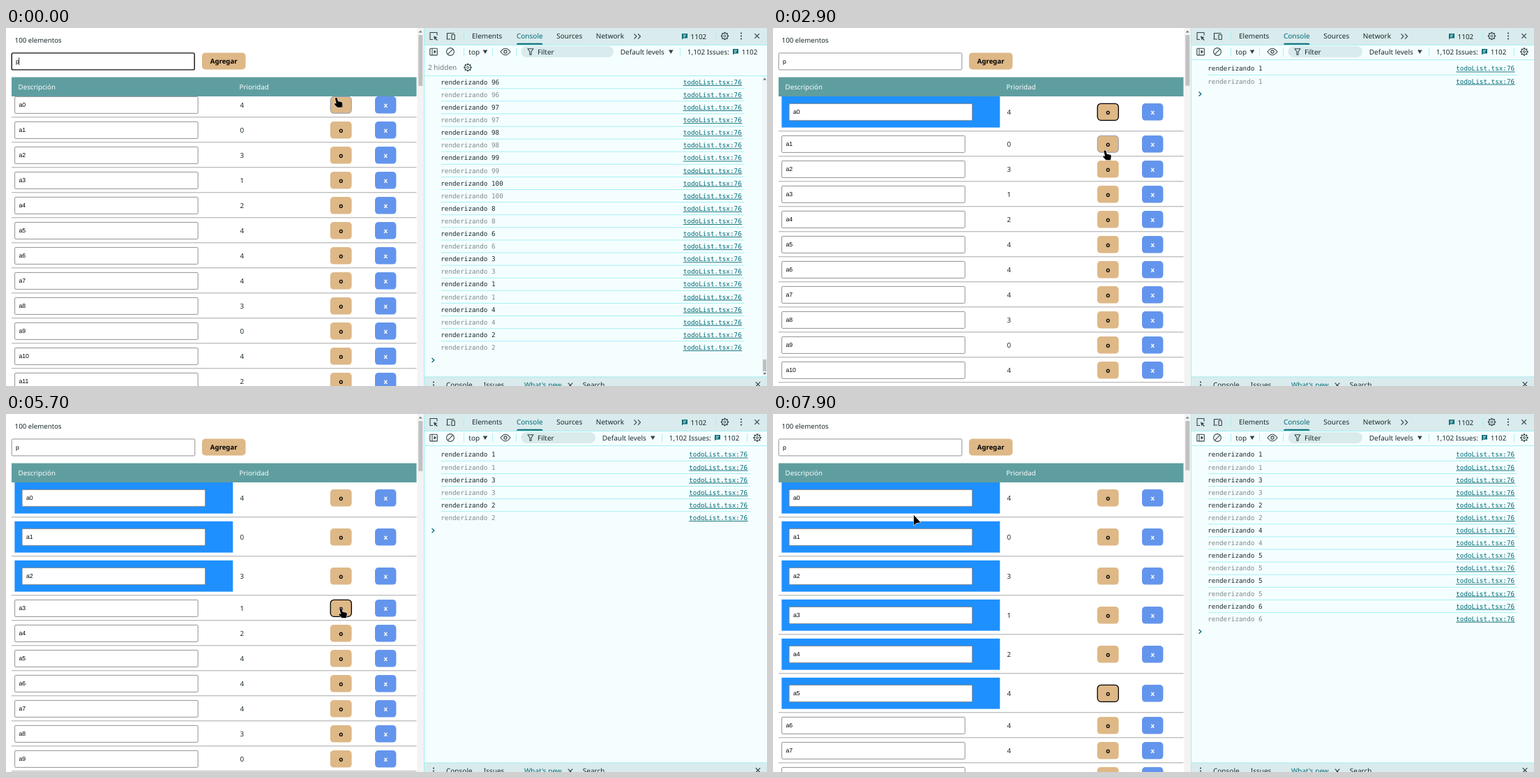
Recreate the animation shown at these times as an HTML page with a canvas. Size 1091 px wide and 513 px high, loop 8 s.

```html
<!DOCTYPE html>
<html lang="es">
<head>
<meta charset="utf-8">
<title>Lista de tareas</title>
<style>
html, body { margin: 0; width: 100%; height: 100%; overflow: hidden; background: #fff; }
canvas { display: block; width: 1091px; height: 513px; }
</style>
</head>
<body>
<canvas id="stage"></canvas>
<script>
const W = 1091, H = 513, LOOP = 8000, STEP = 100;
const canvas = document.getElementById('stage');
const ctx = canvas.getContext('2d');
const dpr = window.devicePixelRatio || 1;
canvas.width = W * dpr;
canvas.height = H * dpr;

const SANS = '"Noto Sans", "Open Sans", sans-serif';
const MONO = '"DejaVu Sans Mono", "Noto Sans Mono", monospace';
const ARIAL = '"Liberation Sans", Arial, sans-serif';
const INK = '#1c2b2d', TEAL = '#006a75', BAR = '#d9ebed', PANEL = '#f5feff', LINE = '#a6f0f3', ICON = '#334345';

const priorities = [4, 0, 3, 1, 2, 4, 4, 4, 3, 0, 4, 2];
const oldLogs = [96, 97, 98, 99, 100, 8, 6, 3, 1, 4, 2];
// [time, row that opens or -1, logged number]
const renders = [[2900, 0, 1], [3700, 2, 3], [4800, 1, 2], [5800, 3, 4], [6700, 4, 5], [6900, -1, 5], [7600, 5, 6]];
// [time, focused row]
const focuses = [[2900, 0], [3500, 2], [4600, 1], [5700, 3], [6500, 4], [7400, 5]];
// [first step, last step, x, y]
const moves = [
  [100, 700, 639, 28.5], [1500, 2300, 478, 107], [2900, 2900, 476, 175.5], [3000, 3400, 479, 204],
  [3700, 4500, 479, 165.5], [5000, 5600, 480, 278.5], [6000, 6400, 477, 339.5], [6800, 7300, 477, 386],
  [7900, 7900, 201.8, 144.8]
];

function pointer(t) {
  let x = 473.5, y = 100;
  for (const [a, b, nx, ny] of moves) {
    if (t < a) break;
    const p = Math.min(1, (t - a + STEP) / (b - a + STEP));
    const e = p * p * (3 - 2 * p);
    x += (nx - x) * e;
    y += (ny - y) * e;
  }
  return { x, y };
}

function text(s, x, y, size, color = INK, { font = SANS, weight = 400, align = 'left' } = {}) {
  ctx.font = `${weight} ${size}px ${font}`;
  ctx.textAlign = align;
  ctx.fillStyle = color;
  ctx.fillText(s, x, y);
}
function rect(x, y, w, h, color) {
  ctx.fillStyle = color;
  ctx.fillRect(x, y, w, h);
}
function round(x, y, w, h, r, fill, stroke, lw = 1) {
  ctx.beginPath();
  ctx.roundRect(x, y, w, h, r);
  paint(fill, stroke, lw);
}
function circle(x, y, r, fill, stroke, lw = 1.2) {
  ctx.beginPath();
  ctx.arc(x, y, r, 0, Math.PI * 2);
  paint(fill, stroke, lw);
}
function shape(d, x, y, fill, stroke, lw = 1.2) {
  ctx.save();
  ctx.translate(x, y);
  const path = new Path2D(d);
  ctx.lineJoin = 'round';
  if (stroke) { ctx.strokeStyle = stroke; ctx.lineWidth = lw; ctx.stroke(path); }
  if (fill) { ctx.fillStyle = fill; ctx.fill(path); }
  ctx.restore();
}
function paint(fill, stroke, lw) {
  if (fill) { ctx.fillStyle = fill; ctx.fill(); }
  if (stroke) { ctx.strokeStyle = stroke; ctx.lineWidth = lw; ctx.stroke(); }
}

function field(x, y, value, focused) {
  if (focused) round(x + .5, y + .5, 262, 24, 2, '#fff', '#101010', 1.4);
  else round(x + .5, y + .5, 262.6, 24, 1.5, '#fff', '#858585', .9);
  text(value, x + 6.3, y + 15.5, 8.7, '#000', { font: ARIAL });
}

function layout(t) {
  const open = new Set(renders.filter(r => t >= r[0]).map(r => r[1]));
  let top = 92;
  return priorities.map((priority, i) => {
    const big = open.has(i), h = big ? 56 : 36;
    const row = { i, priority, big, top, mid: top + h / 2 + .3, end: top + h };
    top += h;
    return row;
  });
}

function overButton(p, row) {
  return p.x >= 465 && p.x <= 496 && p.y >= row.mid - 12.5 && p.y <= row.mid + 12.5;
}

function drawPage(t, rows, p) {
  const focus = focuses.filter(f => t >= f[0]).pop();
  rect(0, 0, 599, H, '#fff');
  for (const r of rows) {
    const y = r.mid;
    if (r.big) rect(12.4, r.top + 5.8, 312.9, 44.8, '#1e90ff');
    field(r.big ? 22.6 : 12.1, y - 12.4, 'a' + r.i);
    text(r.priority, 335.4, y + 3.5, 9.8);
    const focused = focus && focus[1] === r.i;
    round(464.8, y - 12.3, 30.8, 24.6, 5, '#deb887');
    if (focused) round(465.2, y - 12, 30.1, 24, 5, null, '#000', 1.3);
    else if (overButton(p, r)) round(465.3, y - 11.9, 29.9, 23.8, 5, null, '#8a9bb8', .9);
    text('o', 480.3, y + 3.4, 9.7, '#000', { weight: 700, align: 'center' });
    round(529, y - 12.3, 30.4, 24.6, 5, '#6495ed');
    text('x', 544.2, y + 3.4, 9.7, '#fff', { weight: 700, align: 'center' });
    rect(8, r.end - .8, 580.5, 1.1, '#b0b0b0');
  }
  rect(0, 0, 589, 92, '#fff');
  rect(8, 70.5, 580.5, 27.5, '#5f9ea0');
  text('Descripción', 17.6, 87.6, 9.7, '#fff');
  text('Prioridad', 334.6, 87.6, 9.7, '#fff');
  text('100 elementos', 12.6, 20.7, 9.7);
  field(7.7, 35.4, 'p', t < 900);
  if (t < 400) rect(18.3, 42.5, .8, 10.5, '#000');
  round(281, 35.4, 62.5, 24, 5, '#deb887');
  text('Agregar', 312.2, 50.7, 9.6, '#000', { weight: 700, align: 'center' });

  rect(589.5, 0, 9.5, H, '#f3f3f3');
  shape('M-2.6 1.5 L0 -1.5 L2.6 1.5Z', 594.2, 5, '#7c7c7c');
  const extra = rows.filter(r => r.big).length * 20;
  rect(591.3, 10, 6, 73 * 3712 / (3712 + extra), '#c1c1c1');
}

function gear(x, y) {
  for (let i = 0; i < 8; i++) {
    ctx.save();
    ctx.translate(x, y);
    ctx.rotate(i * Math.PI / 4);
    rect(-1, -5.7, 2, 2, ICON);
    ctx.restore();
  }
  circle(x, y, 4.1, null, ICON, 1);
  circle(x, y, 1.5, null, ICON, 1);
}
function cross(x, y) { shape('M-3.3 -3.3 L3.3 3.3 M3.3 -3.3 L-3.3 3.3', x, y, null, ICON, 1.2); }
function dots(x, y) { for (const d of [-4, 0, 4]) circle(x, y + d, 1.1, ICON); }
function caretDown(x, y) { shape('M-3.3 -2.5 H3.3 L0 3Z', x, y, ICON); }
function divider(x, y) { rect(x, y - 6, .9, 12, LINE); }
function issueIcon(x, y) {
  shape('M-4 -4 H4 V2.5 H-2 L-4 4.5Z', x, y, TEAL);
  rect(x - 2.2, y - 2.4, 4.4, 1, '#fff');
  rect(x - 2.2, y - .2, 3.2, 1, '#fff');
}

function drawTabs() {
  rect(599, 0, 492, 24, BAR);
  shape('M-1 5 H-5 V-5 H5 V-1', 613, 11.5, null, ICON, 1.1);
  shape('M0 0 L5.5 2 L3.1 3 L5.8 5.5 L4.8 6.5 L2.2 3.9 L1.5 6Z', 613, 11.5, ICON);
  shape('M-5.5 4.5 H0 M-4.5 4 V-4 H5.5', 637, 11.5, null, ICON, 1.2);
  round(639, 9.5, 4.3, 7, .5, BAR, ICON, 1.1);
  divider(656, 11.5);
  const tabs = [['Elements', 668], ['Console', 732], ['Sources', 789.3], ['Network', 845.8]];
  for (const [name, x] of tabs) text(name, x, 15.4, 10, name === 'Console' ? TEAL : INK);
  round(732, 21.8, 37.5, 2, [2, 2, 0, 0], TEAL);
  shape('M-4.5 -3.7 L-1 0 L-4.5 3.7 M1 -3.7 L4.5 0 L1 3.7', 905, 12, null, ICON, 1.1);
  issueIcon(973, 12);
  text('1102', 981.6, 15.5, 9.9);
  divider(1017, 11.5);
  gear(1030.5, 11.5);
  dots(1054, 11.5);
  cross(1076.7, 11.5);
}

function drawToolbar(cleared, p) {
  const dx = cleared ? 0 : 26;
  rect(599, 24, 492, 21.5, PANEL);
  rect(599, 24, 492, 1, LINE);
  rect(599, 45, 492, 1, cleared ? LINE : PANEL);
  round(607.8, 29.3, 10.5, 9.6, 1, null, ICON, 1.1);
  shape('M-2 -4.5 V4.5 M1 -2 L3.4 0 L1 2Z', 613, 34, ICON, ICON, 1);
  if (p.x > 627 && p.x < 648 && p.y > 24 && p.y < 44) circle(637, 34, 9, '#d8e5e7');
  circle(637, 34, 5.4, null, ICON, 1.1);
  shape('M-3.8 3.8 L3.8 -3.8', 637, 34, null, ICON, 1.1);
  divider(656, 34);
  text('top', 663.3, 37.6, 10);
  caretDown(687, 34);
  divider(697, 34);
  shape('M-7 0 Q0 -9.5 7 0 Q0 9.5 -7 0Z', 716, 34, null, ICON, 1.1);
  circle(716, 34, 2.1, null, ICON, 1.1);
  divider(731, 34);
  round(738.5, 26, 106.5 + dx, 16, 8, BAR);
  shape('M-4 -4.2 H4 L1 0 V4.2 H-1 V0Z', 752, 34, null, ICON, 1.1);
  text('Filter', 762, 37.6, 10);
  text('Default levels', 854.8 + dx, 37.6, 10);
  caretDown(927.3 + dx, 34);
  divider(940 + dx, 34);
  text('1,102 Issues:', 950.8 + dx, 37.6, 9.95);
  issueIcon(1020 + dx, 34);
  text('1102', 1028.8 + dx, 37.6, 9.9);
  if (cleared) {
    divider(1062, 34);
    gear(1077, 34);
  } else {
    rect(599, 46, 492, 22, PANEL);
    text('2 hidden', 605, 60.3, 10, '#70797a');
    gear(662, 56.5);
    rect(599, 68, 492, 1, LINE);
  }
}

function drawLogs(list, first, shift) {
  const pitch = 18.1;
  list.flatMap(n => [[n, INK], [n, '#7f898a']]).forEach(([n, color], i, all) => {
    const y = first + i * pitch;
    text('renderizando ' + n, 623.2, y + 3.2, 9.3, color, { font: MONO });
    const x = 979.2 - shift;
    text('todoList.tsx:76', x, y + 3.2, 9.3, TEAL, { font: MONO });
    rect(x, y + 4.3, 84.5, .9, TEAL);
    if (i < all.length - 1) rect(623.5, y + 8.6, 443.5 - shift, 1, LINE);
  });
  const promptY = list.length ? first + list.length * 2 * pitch + .2 : 55;
  shape('M-1.8 -3 L1.5 0 L-1.8 3', 612.3, promptY, null, TEAL, 1.3);
}

function drawDrawer() {
  rect(599, 499.5, 492, 14, BAR);
  rect(599, 499.5, 492, 1, LINE);
  dots(613, 511.5);
  text('Console', 631, 515.4, 10);
  text('Issues', 684.8, 515.4, 10);
  text("What's new", 743, 515.4, 10, TEAL);
  cross(809, 512);
  text('Search', 826.8, 515.4, 10);
  cross(1078, 510.5);
}

function drawDevtools(t, p) {
  const cleared = t >= 1200;
  rect(599, 0, 492, H, PANEL);
  if (cleared) {
    drawLogs(renders.filter(r => t >= r[0]).map(r => r[2]), 58.2, 0);
  } else {
    drawLogs(oldLogs, 77.6, 8.4);
    rect(1084, 69, 7, 430, '#f1f6f7');
    shape('M-2.5 1.5 L0 -1.5 L2.5 1.5Z', 1087.7, 73, '#66787a');
    shape('M-2.5 -1.5 L0 1.5 L2.5 -1.5Z', 1087.7, 495.5, '#66787a');
    rect(1085, 475, 5.2, 17, '#bcc1c2');
  }
  drawTabs();
  drawToolbar(cleared, p);
  drawDrawer();
  rect(599, 0, 1, H, LINE);
}

function drawPointer(p, hand) {
  const d = hand
    ? 'M-1.6 1.2 Q-1 -.6 .4 0 Q1.4 .5 1.6 1.6 L2.5 5 L7 6 Q9 6.5 8.9 8.4 L8.2 11.3 L8 13.7 H1.6 L-1.8 10.4 Q-3.4 8.6 -2.4 7.9 Q-1.5 7.4 .1 8.6Z'
    : 'M0 0 L0 14.8 L3.8 11.5 L9.6 10.5Z';
  shape(d, p.x, p.y, '#000', '#fff', 1.1);
}

function draw(now) {
  const t = Math.floor((now % LOOP) / STEP) * STEP;
  const p = pointer(t), rows = layout(t);
  ctx.setTransform(dpr, 0, 0, dpr, 0, 0);
  ctx.textRendering = 'geometricPrecision';
  drawPage(t, rows, p);
  drawDevtools(t, p);
  drawPointer(p, rows.some(r => overButton(p, r)));
}

let start;
function tick(now) {
  start ??= now;
  draw(now - start);
  requestAnimationFrame(tick);
}
draw(0);
requestAnimationFrame(tick);
</script>
</body>
</html>
```
